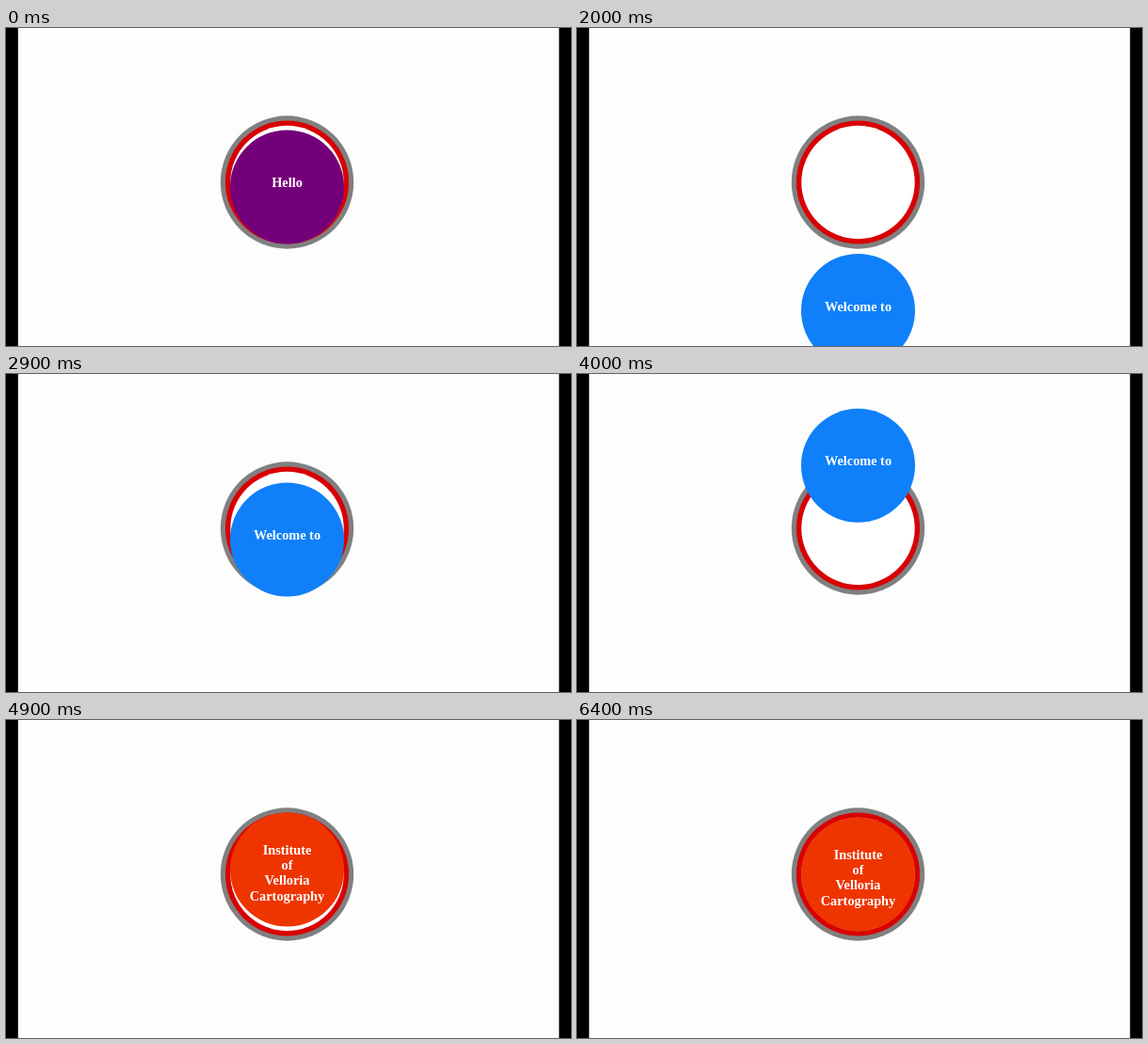
These frames come from a looping animation (600 px wide and 338 px high, 7.9 s). An HTML page:

```html
<!DOCTYPE html>
<html lang="en">
<head>
<meta charset="utf-8">
<title>Scrolling discs</title>
<style>
  html, body { margin: 0; width: 100%; height: 100%; overflow: hidden; background: #000; }
  svg { display: block; width: 100%; height: 100%; }
  text {
    font: bold 14.3px "Liberation Serif", "Times New Roman", serif;
    fill: #fff;
    text-anchor: middle;
  }
</style>
</head>
<body>
<svg viewBox="0 0 600 338">
  <rect x="12.8" width="574.5" height="338" fill="#fdfdfe"/>
  <g transform="translate(298.5 164)">
    <circle r="70.7" fill="#808080"/>
    <circle r="65.6" fill="#d80003"/>
    <circle r="60.2" fill="#fff"/>
    <g id="discs"></g>
  </g>
</svg>
<script>
const LOOP = 7900, STEP = 100, GAP = 409, LINE = 16.4;
const NS = "http://www.w3.org/2000/svg";

const discs = [
  { color: "#740079", lines: ["Hello"], base: 0 },
  { color: "#0f80f9", lines: ["Welcome to"], base: 0 },
  { color: "#ee3500", lines: ["Institute", "of", "Velloria", "Cartography"], base: -LINE }
];

const linear = u => u;
const gather = u => u ** 1.23;
const smooth = u => u < 0.5 ? 4 * u ** 3 : 1 - 4 * (1 - u) ** 3;

// Each move scrolls on from where the one before it stopped.
const REST = -5;
const moves = [
  { from: 1385, until: 2000, to: 272.5, ease: smooth },
  { from: 2000, until: 2900, to: 397, ease: linear },
  { from: 3100, until: 3500, to: 454, ease: smooth },
  { from: 3900, until: 4900, to: 823, ease: gather },
  { from: 5400, until: 6400, to: 2 * GAP, ease: smooth }
];

function add(parent, tag, attrs) {
  const node = document.createElementNS(NS, tag);
  for (const name in attrs) node.setAttribute(name, attrs[name]);
  return parent.appendChild(node);
}

const root = document.getElementById("discs");
discs.forEach((disc, i) => {
  const group = add(root, "g", { transform: `translate(0 ${i * GAP})` });
  add(group, "circle", { r: 60.5, fill: disc.color });
  disc.lines.forEach((line, n) => {
    add(group, "text", { y: disc.base + n * LINE }).textContent = line;
  });
});

function scrollAt(t) {
  return moves.reduce((pos, { from, until, to, ease }) => {
    const u = Math.min(1, Math.max(0, (t - from) / (until - from)));
    return pos + (to - pos) * ease(u);
  }, REST);
}

function draw(ms) {
  const t = Math.floor((ms % LOOP) / STEP) * STEP;
  // Hold the first pose until the first visible step.
  const pos = t < 1500 ? REST : scrollAt(t);
  root.setAttribute("transform", `translate(0 ${-pos})`);
}

const start = performance.now();
function tick() {
  draw(performance.now() - start);
  requestAnimationFrame(tick);
}
tick();
</script>
</body>
</html>
```
